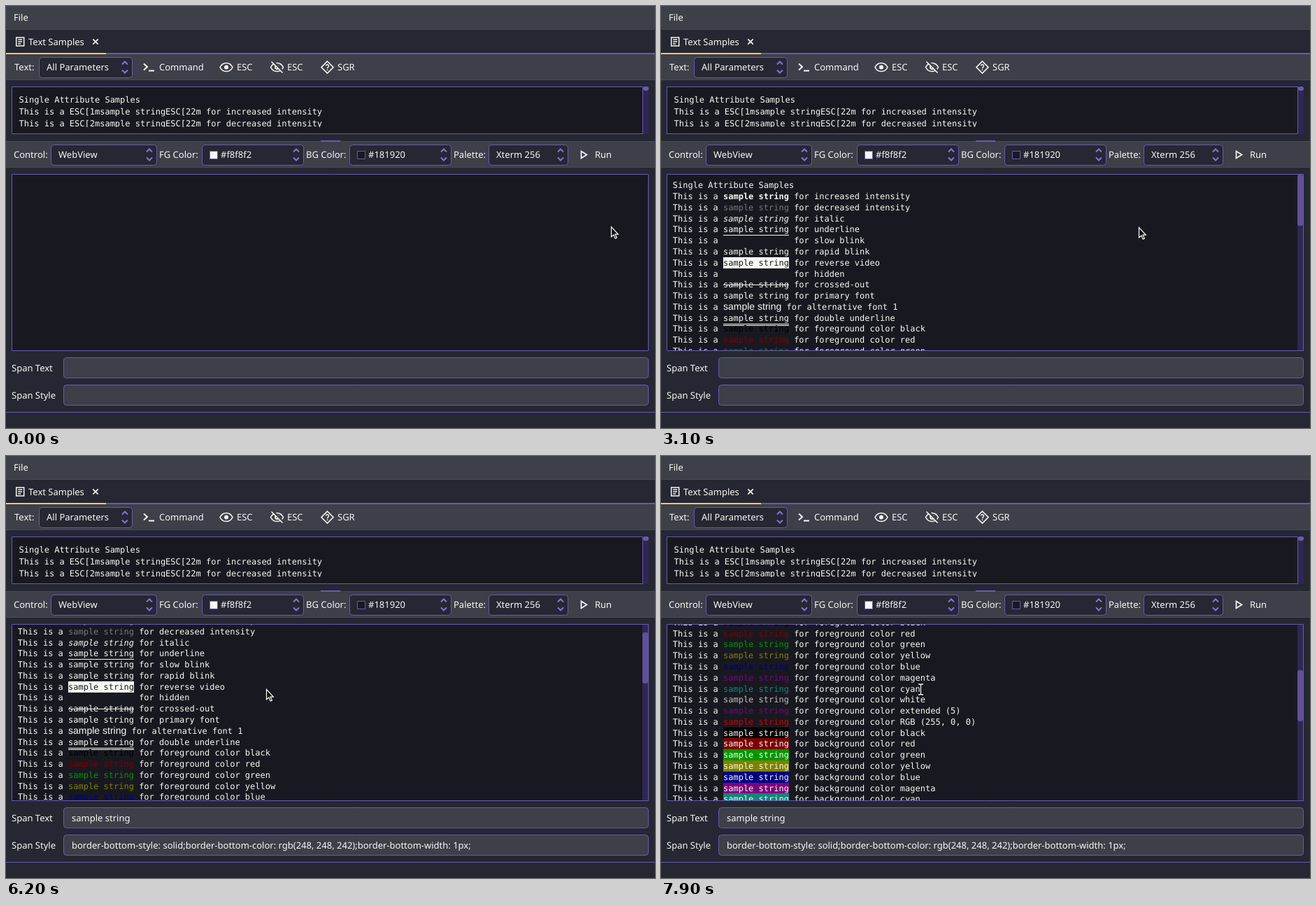
Animation of 928x603 px, one loop 8 s. Source, as an HTML page with a canvas:

```html
<!DOCTYPE html>
<html lang="en">
<head>
<meta charset="utf-8">
<title>Text Samples</title>
<style>
html, body { margin: 0; width: 100%; height: 100%; overflow: hidden; background: #252732; }
canvas { display: block; }
</style>
</head>
<body>
<canvas id="stage" width="928" height="603"></canvas>
<script>
const ctx = document.getElementById('stage').getContext('2d');
const LOOP = 8000, TICK = 100;
const UI = '13px "Noto Sans", sans-serif';
const MONO = '12px "DejaVu Sans Mono", monospace';
const ALT = '14px "Liberation Sans", sans-serif';
const FG = '#f8f8f2', BG = '#181920', PAGE = '#252732', BAR = '#3d3f49';
const BORDER = '#685ab3', MUTED = '#4a4080', ACCENT = '#8572e0', TRACK = '#2f2753', THUMB = '#5f5099';

const LINE = 15.78, LEFT = 16.8, CELL = 7.224, SPAN = 89, SPAN_W = 13 * CELL;
const SAMPLE = 'sample string';
const NAMES = ['black', 'red', 'green', 'yellow', 'blue', 'magenta', 'cyan'];
const COLORS = ['#000', '#7c0004', '#009600', '#808000', '#000080', '#7c047c', '#10867c'];

const rows = [
  ['increased intensity', { font: 'bold ' + MONO }],
  ['decreased intensity', { color: '#77777a' }],
  ['italic', { font: 'italic ' + MONO }],
  ['underline', { lines: [4] }],
  ['slow blink', { visible: slowBlink }],
  ['rapid blink', { visible: rapidBlink }],
  ['reverse video', { color: BG, back: FG }],
  ['hidden', { visible: () => false }],
  ['crossed-out', { lines: [-4] }],
  ['primary font', {}],
  ['alternative font 1', { font: ALT }],
  ['double underline', { lines: [4, 6] }],
  ...NAMES.map((name, i) => ['foreground color ' + name, { color: COLORS[i] }]),
  ['foreground color white', { color: '#c0c0c0' }],
  ['foreground color extended (5)', { color: COLORS[5] }],
  ['foreground color RGB (255, 0, 0)', { color: '#d00000' }],
  ...NAMES.map((name, i) => ['background color ' + name, { back: COLORS[i] }])
];

// Pointer keys: time, x, y
const PATH = [
  [0, 865, 315], [400, 861, 271], [600, 858, 245], [700, 856, 225], [800, 856, 215],
  [2300, 856, 215], [2400, 855, 219], [2500, 847, 224], [2700, 752, 291], [2900, 715, 308],
  [3100, 683, 316], [3300, 640, 319], [3400, 589, 330], [3900, 480, 351], [4400, 345, 320],
  [4600, 322, 300], [4700, 306, 293], [4800, 290, 306], [5000, 230, 316], [5100, 182, 320],
  [5300, 138, 321], [5500, 138, 321], [5600, 205, 326], [5700, 312, 331], [5800, 372, 333], [LOOP, 372, 333]
];
const PAUSES = [500, 2600, 2800, 3200, 3500, 4500, 4900, 5200];
const SCROLLS = [6200, 6300, 6800, 6900, 7400, 7500], NOTCH = 37.1, SETTLE = 7900;

function rapidBlink(t) {
  if (t < 3300) return (t >= 2400 && t < 2700) || t >= 2900;
  return Math.floor((t - 3300) / 245) % 2 === 1;
}

function slowBlink(t) {
  if (t < 3270) return t >= 2700 && t < 3100;
  return Math.floor((t - 3270) / 490) % 2 === 1;
}

function scrollAt(t) {
  return SCROLLS.filter(start => t >= start).length * NOTCH + (t >= SETTLE ? 1 : 0);
}

function pointerAt(t) {
  if (PAUSES.includes(t)) t -= TICK;
  const i = PATH.findIndex(key => key[0] > t);
  const [t0, x0, y0] = PATH[i - 1], [t1, x1, y1] = PATH[i];
  const k = (t - t0) / (t1 - t0);
  return [Math.round(x0 + (x1 - x0) * k), Math.round(y0 + (y1 - y0) * k)];
}

function rect(color, x, y, w, h) {
  ctx.fillStyle = color;
  ctx.fillRect(x, y, w, h);
}

function box(x, y, w, h, fill, stroke, radius = 0) {
  ctx.beginPath();
  ctx.roundRect(x + 0.5, y + 0.5, w - 1, h - 1, radius);
  ctx.fillStyle = fill;
  ctx.fill();
  if (!stroke) return;
  ctx.strokeStyle = stroke;
  ctx.lineWidth = 1;
  ctx.stroke();
}

function pill(color, x, y, w, h) {
  ctx.beginPath();
  ctx.roundRect(x, y, w, h, 3);
  ctx.fillStyle = color;
  ctx.fill();
}

function text(string, x, y, color = FG, font = UI) {
  ctx.font = font;
  ctx.fillStyle = color;
  ctx.fillText(string, x, y);
}

function icon(path, x, y, width = 1.6, color = FG, fill) {
  const shape = new Path2D(path);
  ctx.save();
  ctx.translate(x, y);
  if (fill) {
    ctx.fillStyle = fill;
    ctx.fill(shape);
  }
  ctx.strokeStyle = color;
  ctx.lineWidth = width;
  ctx.stroke(shape);
  ctx.restore();
}

function clipped(x, y, w, h, draw) {
  ctx.save();
  ctx.beginPath();
  ctx.rect(x, y, w, h);
  ctx.clip();
  draw();
  ctx.restore();
}

function combo(x, y, w, label, labelX) {
  box(x, y, w, 30, PAGE, BORDER, 4);
  text(label, labelX, y + 19);
  icon('M-4 -4L0 -8L4 -4M-4 4L0 8L4 4', x + w - 11, y + 14.5, 2, ACCENT);
}

function drawHeader() {
  rect(BAR, 0, 0, 928, 33);
  rect(MUTED, 0, 33, 928, 1);
  text('File', 11, 21);

  icon('M1 0.5H12V12.5H1ZM3.5 3.5H9.5M3.5 6.5H9.5M3.5 9.5H7.5', 13.7, 44.5, 1.5);
  text('Text Samples', 32, 56);
  icon('M-3.7 -3.7L3.7 3.7M3.7 -3.7L-3.7 3.7', 128, 51, 1.7);
  rect(BORDER, 0, 67, 928, 2);
  rect('#f1cb62', 0, 67, 143, 2);

  rect(BAR, 0, 69, 928, 36);
  rect(MUTED, 0, 105, 928, 1);
  text('Text:', 12, 92);
  combo(47, 73, 134, 'All Parameters', 58);
  icon('M0 -4.5L5 0L0 4.5M7 5.5H15', 197, 87, 2);
  text('Command', 219, 92);

  const eye = 'M-9 0Q-6 -6 0 -6T9 0Q6 6 0 6T-9 0Z';
  icon(eye, 315, 87.5);
  icon('M2.2 0A2.2 2.2 0 1 1 -2.2 0A2.2 2.2 0 1 1 2.2 0', 315, 87.5, 1.6, FG, FG);
  text('ESC', 330, 92);
  icon(eye + 'M2.6 0A2.6 2.6 0 1 1 -2.6 0A2.6 2.6 0 1 1 2.6 0', 387.5, 87.5);
  icon('M-6 -9L9 7', 387.5, 87.5, 3, BAR);
  icon('M-8 -8L8 8', 387.5, 87.5);
  text('ESC', 402, 92);
  icon('M0 -8.5L8.5 0L0 8.5L-8.5 0Z', 459.5, 87.5);
  icon('M-2 -2A2 2 0 1 1 1.3 -0.4Q0 0.4 0 1.7M0 3V4.4', 459.5, 87.5, 1.4);
  text('SGR', 474, 92);
}

function drawSource() {
  rect(TRACK, 911, 115, 8, 68);
  box(8, 115, 903, 68, BG, BORDER);
  pill('#6b5bb0', 911, 115, 8, 6);
  const lines = [
    'Single Attribute Samples',
    'This is a ESC[1msample stringESC[22m for increased intensity',
    'This is a ESC[2msample stringESC[22m for decreased intensity'
  ];
  clipped(9, 116, 900, 57, () => lines.forEach((s, i) => text(s, 18.6, 138 + 17 * i, FG, MONO)));
  rect(BORDER, 450, 192, 28, 2);
}

function drawControls(t) {
  rect(BAR, 0, 194, 928, 36);
  rect(MUTED, 0, 193, 450, 1);
  rect(MUTED, 478, 193, 450, 1);
  rect(MUTED, 0, 230, 928, 1);
  text('Control:', 11, 217);
  combo(64, 198, 152, 'WebView', 75);
  text('FG Color:', 219, 217);
  combo(280, 198, 146, '#f8f8f2', 307);
  box(291, 207, 12, 12, FG, BORDER);
  text('BG Color:', 429, 217);
  combo(491, 198, 146, '#181920', 518);
  box(502, 207, 12, 12, BG, BORDER);
  text('Palette:', 640, 217);
  combo(690, 198, 114, 'Xterm 256', 701);
  if (t >= 700 && t < 2500) {
    const pressed = t >= 1900 && t < 2100;
    box(807, 197, 69, 31, pressed ? '#565763' : '#4a4b56', null, 4);
  }
  icon('M0 -5L8 0L0 5Z', 822.5, 212.5, 1.7);
  text('Run', 842, 217);
}

function drawRow([label, style], y, t) {
  const font = style.font || MONO;
  let tail = SPAN + SPAN_W + CELL;
  text('This is a', LEFT, y, FG, MONO);
  if (style.back) rect(style.back, SPAN, y - 12, 94, 16);
  if (!style.visible || style.visible(t)) text(SAMPLE, SPAN, y, style.color, font);
  if (font === ALT) tail = SPAN + ctx.measureText(SAMPLE).width + CELL;
  (style.lines || []).forEach(dy => rect(FG, SPAN, y + dy, 94, 1));
  text('for ' + label, tail, y, FG, MONO);
}

function drawOutput(t) {
  box(8, 240, 911, 253, BG, BORDER);
  if (t < 2100) return;
  const scroll = scrollAt(t);
  const baseline = i => Math.round(260.3 + LINE * i - scroll);
  clipped(9, 241, 909, 251, () => {
    text('Single Attribute Samples', LEFT, baseline(0), FG, MONO);
    rows.forEach((row, i) => drawRow(row, baseline(i + 1), t));
    rect(TRACK, 910, 241, 8, 251);
    pill(THUMB, 910, 241 + Math.round(scroll * 0.29), 8, 73);
  });
}

function drawFields(t) {
  const selected = t >= 5500;
  const css = 'border-bottom-style: solid;border-bottom-color: rgb(248, 248, 242);border-bottom-width: 1px;';
  [['Span Text', SAMPLE, 502], ['Span Style', css, 541]].forEach(([label, value, y]) => {
    text(label, 8, y + 20);
    box(82, y, 837, 30, BAR, BORDER, 4);
    if (selected) text(value, 94, y + 20);
  });
  rect(BORDER, 0, 580, 928, 1);
}

function drawPointer(t) {
  const [x, y] = pointerAt(t);
  if ((t >= 5000 && t < 5700) || t >= SETTLE) {
    const beam = 'M-3.5 -7.5H-1L0 -6.5L1 -7.5H3.5M0 -6.5V6.5M-3.5 7.5H-1L0 6.5L1 7.5H3.5';
    icon(beam, x - 0.5, y + 0.5, 3, '#000');
    icon(beam, x - 0.5, y + 0.5, 1.3, '#fff');
  } else {
    icon('M0.5 0.5V15L3.8 12L6.2 17.3L8.4 16.3L6 11.2H10.3Z', x, y, 1.2, '#fff', '#111');
  }
}

function frame(now) {
  const t = Math.floor((now % LOOP) / TICK) * TICK;
  ctx.textRendering = 'geometricPrecision';
  rect(PAGE, 0, 0, 928, 603);
  drawHeader();
  drawSource();
  drawControls(t);
  drawOutput(t);
  drawFields(t);
  drawPointer(t);
}

const start = performance.now();
function loop() {
  frame(performance.now() - start);
  requestAnimationFrame(loop);
}
loop();
</script>
</body>
</html>
```
